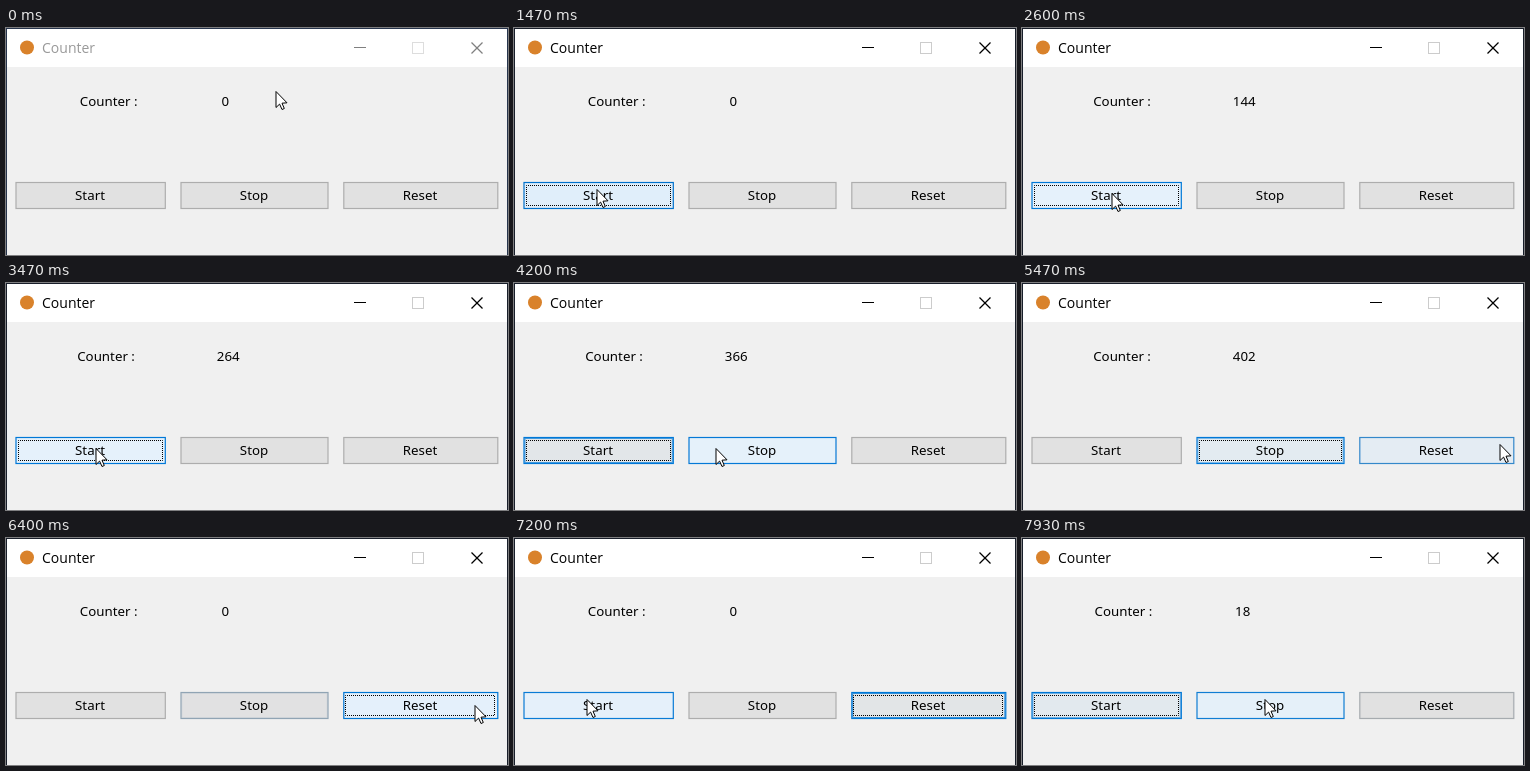
Animation of 502 by 227 pixels, one loop 8000 ms. Source, as an HTML page with a canvas:

```html
<!DOCTYPE html>
<html lang="en">
<head>
<meta charset="utf-8">
<title>Counter</title>
<style>
  html, body { margin: 0; width: 100%; height: 100%; overflow: hidden; background: #f0f0f0; }
  canvas { display: block; width: 502px; height: 227px; }
</style>
</head>
<body>
<canvas id="stage" width="502" height="227"></canvas>
<script>
const ctx = document.getElementById('stage').getContext('2d');
const LOOP = 8000, STEPS = 120, STEP = LOOP / STEPS;
const UI_FONT = '13.3px "Noto Sans", "Open Sans", sans-serif';
const TITLE_FONT = '14px "Open Sans", "Noto Sans", sans-serif';
const TOP = 154.5, HEIGHT = 26;

// rate: share of the remaining change made in each step
const STYLES = {
  normal:  { fill: [225, 225, 225], edge: [173, 173, 173], inner: 0, rate: 0.3 },
  hover:   { fill: [229, 241, 251], edge: [0, 120, 215], inner: 0, rate: 0.45 },
  press:   { fill: [204, 228, 247], edge: [0, 84, 153], inner: 0, rate: 0.2 },
  default: { fill: [225, 225, 225], edge: [0, 120, 215], inner: 1, rate: 0.15 }
};

const START = { label: 'Start', x: 10, w: 149.3, mid: 84 };
const STOP = { label: 'Stop', x: 175, w: 147, mid: 248 };
const RESET = { label: 'Reset', x: 337.8, w: 154, mid: 414 };
const BUTTONS = [START, STOP, RESET];

const HOLD = 100;
const CLICKS = [
  { at: 1470, button: START },
  { at: 4330, button: STOP },
  { at: 6130, button: RESET },
  { at: 7400, button: START }
];

const HOME = { x: 270, y: 63 };
const MOVES = [
  { from: 0, to: 870, x: 83, y: 161 },
  { from: 1600, to: 2270, x: 90, y: 165 },
  { from: 3470, to: 4000, x: 202, y: 165 },
  { from: 5200, to: 5470, x: 478, y: 161 },
  { from: 6330, to: 7130, x: 73, y: 161, dip: 21 },
  { from: 7470, to: 7870, x: 243, y: 161 }
];

const clamp = (v, lo, hi) => Math.min(hi, Math.max(lo, v));
const mix = (a, b, k) => a + (b - a) * k;
const mixColor = (a, b, k) => a.map((v, i) => mix(v, b[i], k));
const ease = k => k * k * (3 - 2 * k);
const rgb = (c, alpha = 1) => `rgba(${c.map(Math.round).join(',')},${alpha})`;
const timeOf = step => Math.round(step * STEP / 10) * 10;

function pointerAt(t) {
  let { x, y } = HOME;
  for (const m of MOVES) {
    const k = clamp((t - m.from) / (m.to - m.from), 0, 1);
    x = mix(x, m.x, ease(k));
    y = mix(y, m.y, ease(k)) + (m.dip || 0) * Math.sin(Math.PI * k);
  }
  return { x: Math.round(x), y: Math.round(y) };
}

function countAt(t) {
  const elapsed = t < 6130 ? clamp(t - 1562, 0, 2898) : Math.max(0, t - 7800);
  return Math.floor(elapsed * 0.13875);
}

const lastClick = t => CLICKS.filter(c => c.at <= t).pop();

function stateOf(b, t) {
  const click = lastClick(t), p = pointerAt(t);
  const focused = click && click.button === b;
  if (focused && t < click.at + HOLD) return STYLES.press;
  const inside = p.x >= b.x && p.x <= b.x + b.w && p.y >= TOP && p.y <= TOP + HEIGHT;
  return inside ? STYLES.hover : focused ? STYLES.default : STYLES.normal;
}

function lookAt(b, step) {
  let look = STYLES.normal;
  for (let i = 0; i <= step; i++) {
    const goal = stateOf(b, timeOf(i)), k = goal.rate;
    look = {
      fill: mixColor(look.fill, goal.fill, k),
      edge: mixColor(look.edge, goal.edge, k),
      inner: mix(look.inner, goal.inner, k)
    };
  }
  return look;
}

function rect(color, x, y, w, h) {
  ctx.fillStyle = color;
  ctx.fillRect(x, y, w, h);
}

function outline(color, x, y, w, h, width = 1) {
  ctx.strokeStyle = color;
  ctx.lineWidth = width;
  ctx.strokeRect(x, y, w, h);
}

function text(str, x, y, font, color, align = 'left') {
  ctx.font = font;
  ctx.fillStyle = color;
  ctx.textAlign = align;
  ctx.fillText(str, x, y);
}

function line(x1, y1, x2, y2) {
  ctx.beginPath();
  ctx.moveTo(x1, y1);
  ctx.lineTo(x2, y2);
  ctx.stroke();
}

function drawWindow(active) {
  const ink = active ? '#000000' : '#808080';
  rect(active ? '#181e2a' : '#26344c', 0, 0, 502, 227);
  rect('#f0f0f0', 1, 1, 500, 226);
  rect('#ffffff', 1, 1, 500, 38);

  ctx.fillStyle = '#d9822b';
  ctx.beginPath();
  ctx.arc(21, 19.5, 7, 0, Math.PI * 2);
  ctx.fill();
  text('Counter', 36, 25, TITLE_FONT, active ? '#000000' : '#999999');

  rect(ink, 348, 19, 12, 1);
  outline(active ? '#cccccc' : '#dddddd', 406.5, 14.5, 11, 11);
  ctx.strokeStyle = ink;
  ctx.lineWidth = 1.2;
  line(465.5, 14.5, 476.5, 25.5);
  line(476.5, 14.5, 465.5, 25.5);
}

function drawCounter(n) {
  const str = String(n), extra = str.length - 1;
  text('Counter :', 73.8 - 1.3 * extra, 78, UI_FONT, '#000000');
  text(str, 215.4 - 2.3 * extra, 78, UI_FONT, '#000000');
}

function drawButton(b, step) {
  const look = lookAt(b, step), click = lastClick(timeOf(step));
  rect(rgb(look.fill), b.x, TOP, b.w, HEIGHT);
  outline(rgb(look.edge, look.inner), b.x + 1, TOP + 1, b.w - 2, HEIGHT - 2);
  outline(rgb(look.edge), b.x, TOP, b.w, HEIGHT, 1.2);
  if (click && click.button === b) {
    ctx.setLineDash([1, 1]);
    ctx.lineDashOffset = 0.5;
    outline('#000000', Math.floor(b.x) + 2.5, TOP + 3, Math.floor(b.w) - 5, HEIGHT - 6);
    ctx.setLineDash([]);
  }
  text(b.label, b.mid, 172, UI_FONT, '#000000', 'center');
}

function drawPointer({ x, y }) {
  ctx.save();
  ctx.translate(x, y + 0.5);
  ctx.lineWidth = 1;
  ctx.lineJoin = 'round';
  ctx.fillStyle = '#ffffff';
  ctx.strokeStyle = '#000000';
  const arrow = new Path2D('M0 0V16L3.6 12.6L6 18L8.3 17L6 11.7L11 11.3Z');
  ctx.fill(arrow);
  ctx.stroke(arrow);
  ctx.restore();
}

function draw(step) {
  const t = timeOf(step);
  drawWindow(t >= CLICKS[0].at);
  drawCounter(countAt(t));
  BUTTONS.forEach(b => drawButton(b, step));
  drawPointer(pointerAt(t));
}

// The screen refreshes 15 times a second.
const begun = performance.now();
let shown = -1;
function tick() {
  const t = (performance.now() - begun) % LOOP;
  const step = Math.min(STEPS - 1, Math.floor((t + 4) / STEP));
  if (step !== shown) draw(shown = step);
  requestAnimationFrame(tick);
}
tick();
</script>
</body>
</html>
```
